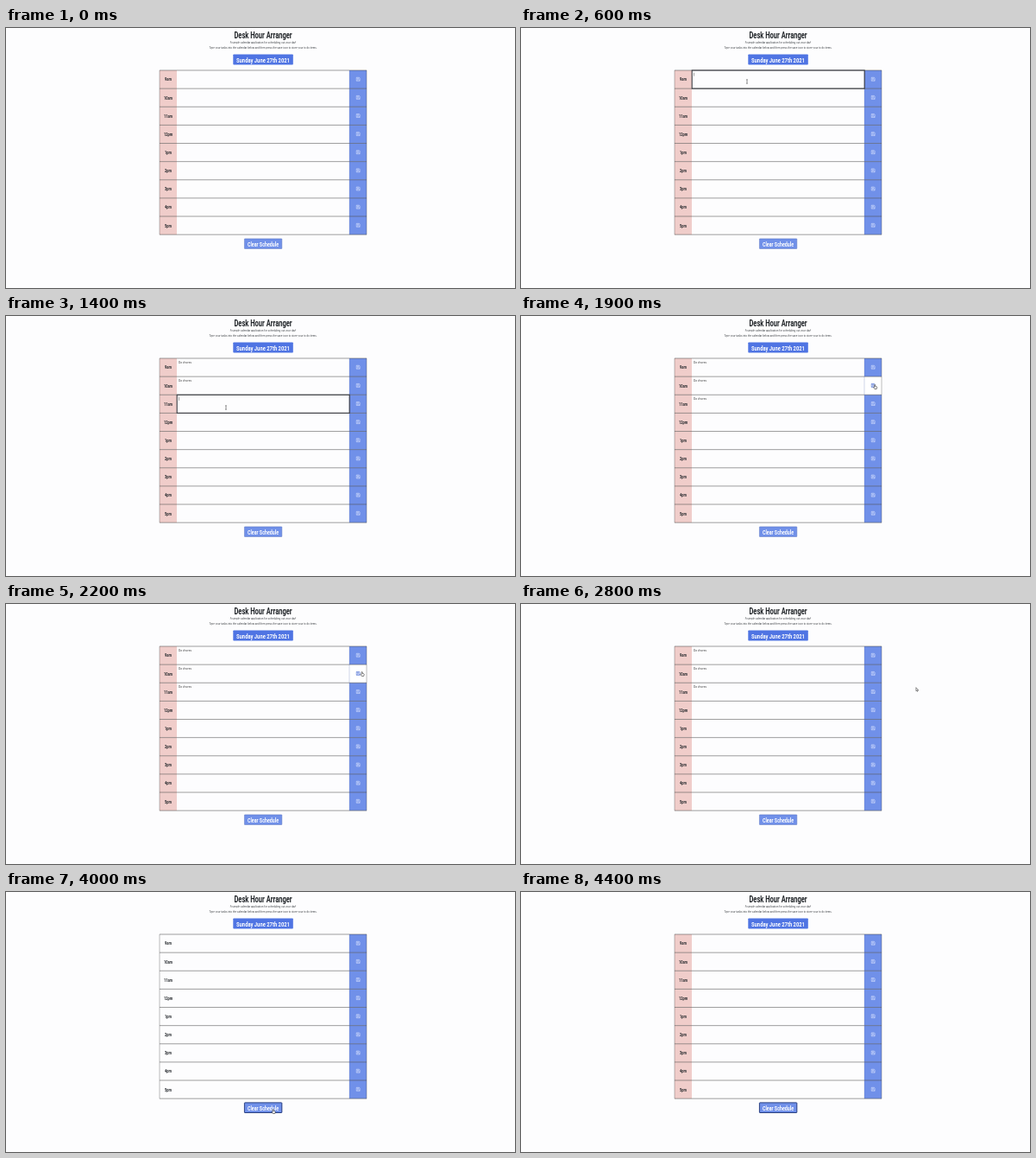
These frames come from a looping animation (590x301 px, 5700 ms). An HTML page:

```html
<!DOCTYPE html>
<html lang="en">
<head>
<meta charset="utf-8">
<title>Day planner</title>
<style>
  html, body { margin: 0; width: 100%; height: 100%; overflow: hidden; background: #fdfdfe; }
  svg { display: block; width: 590px; height: 301px; }
  .heading { font-family: Roboto, sans-serif; font-weight: 700; text-anchor: middle; }
  .small { font-family: Inter, sans-serif; font-size: 2.8px; text-anchor: middle; fill: #33373b; }
  .entry { font-family: "Noto Sans", sans-serif; font-size: 3.2px; fill: #333; }
</style>
</head>
<body>
<svg id="stage" viewBox="0 0 590 301"></svg>
<script>
const LOOP = 5700, STEP = 100;
const TOP = 49, ROW = 21.13, LEFT = 178, TEXT_LEFT = 198, SAVE_LEFT = 398, RIGHT = 418;
const HOURS = ["9am", "10am", "11am", "12pm", "1pm", "2pm", "3pm", "4pm", "5pm"];
const BLUE = "#7090e9", PINK = "#f0cdca", INK = "#212529", TASK = "Do chores";
const stage = document.getElementById("stage");

function add(tag, attrs, parent = stage, content = "") {
  const node = document.createElementNS("http://www.w3.org/2000/svg", tag);
  for (const key in attrs) node.setAttribute(key, attrs[key]);
  node.textContent = content;
  parent.append(node);
  return node;
}

const rect = (x, y, width, height, fill, more = {}) =>
  add("rect", { x, y, width, height, fill, ...more });

// One narrow face is shared by every heading.
const heading = (content, x, y, size, fill) => add("text", {
  class: "heading", "font-size": size, fill, transform: `translate(${x} ${y}) scale(.72 1)`
}, stage, content);

const show = (node, visible) => node.setAttribute("visibility", visible ? "visible" : "hidden");

heading("Desk Hour Arranger", 298, 11.6, 10.5, INK);
add("text", { class: "small", x: 298, y: 17.7 }, stage,
  "A simple calendar application for scheduling out your day!");
add("text", { class: "small", x: 298, y: 23.6 }, stage,
  "Type your tasks into the calendar below and then press the save icon to store your to do items.");
rect(263.3, 30.4, 69.5, 12.2, "#4f74e3", { rx: .8 });
heading("Sunday June 27th 2021", 298, 39.6, 8.1, "#fff");

const rows = HOURS.map((hour, i) => {
  const y = TOP + i * ROW, middle = y + ROW / 2;
  const label = rect(LEFT, y, TEXT_LEFT - LEFT, ROW, PINK);
  heading(hour, 188, middle + 1.9, 5.5, INK);
  const text = add("text", { class: "entry", x: 200, y: y + 5.8 });
  const save = rect(SAVE_LEFT, y, RIGHT - SAVE_LEFT, ROW, BLUE);
  const icon = add("path", {
    d: "M-2 -2H1.2L2 -1.2V2H-2Z M-1.2 -2V-.6H.8V-2 M-1.2 2V.5H1.2V2",
    transform: `translate(408.2 ${middle - .3})`, fill: "none", "stroke-width": .5
  });
  return { y, label, text, save, icon };
});

for (let i = 0; i <= HOURS.length; i++) {
  const y = TOP + i * ROW;
  add("path", { d: `M${LEFT} ${y}H${RIGHT}`, stroke: "#444", "stroke-opacity": .65, "stroke-width": .8 });
}
const bottom = TOP + ROW * HOURS.length;
add("path", {
  d: `M${LEFT} ${TOP}V${bottom}M${RIGHT} ${TOP}V${bottom}`,
  stroke: "#444", "stroke-opacity": .5, "stroke-width": .7
});
add("path", { d: `M${SAVE_LEFT} ${TOP}V${bottom}`, stroke: "#4b63a8", "stroke-opacity": .5, "stroke-width": .5 });

const button = rect(276.4, 243.9, 43.4, 11.6, BLUE, { rx: .5 });
heading("Clear Schedule", 298, 252.6, 7.4, "#fff");

const focusBox = rect(TEXT_LEFT + .2, 0, SAVE_LEFT - TEXT_LEFT, ROW, "none",
  { stroke: "#3b3d42", "stroke-width": 1.1 });
const caret = rect(0, 0, .4, 3.8, "#222");

const pointers = {
  beam: add("path", {
    d: "M-1 -2.2H-.3L0 -1.9L.3 -2.2H1M0 -1.9V1.9M-1 2.2H-.3L0 1.9L.3 2.2H1",
    fill: "none", stroke: "#333", "stroke-width": .55
  }),
  hand: add("path", {
    d: "M-.8 -2.3Q-.2 -2.9 .2 -2.2V-.6L1.8 -.2Q2.3 0 2.2 .7L1.7 2.5H-.7L-2 .6Q-1.7 -.2 -.8 .4Z",
    fill: "#fff", stroke: "#222", "stroke-width": .55
  }),
  arrow: add("path", {
    d: "M-1.1 -2.3V1.7L-.2 .9L.4 2.3L1.1 2L.5 .7H1.7Z",
    fill: "#fff", stroke: "#222", "stroke-width": .5
  })
};

// Pointer path: time, x, y.
const path = [
  [100, 300, 205], [400, 262, 62], [900, 262, 62], [1000, 255, 80], [1200, 255, 80],
  [1300, 255, 106], [1500, 255, 106], [1800, 408, 104], [2000, 413, 60], [2200, 413, 81],
  [2500, 413, 83], [2600, 413, 102], [2700, 430, 102], [2800, 459, 99], [3200, 459, 99],
  [3700, 310, 254], [4000, 310, 254], [4300, 473, 205]
];

function pointerAt(t) {
  const next = path.findIndex(point => point[0] >= t);
  if (next < 0 || t < path[0][0]) return null;
  const [t1, x1, y1] = path[next];
  const [t0, x0, y0] = path[Math.max(next - 1, 0)];
  const k = t1 > t0 ? (t - t0) / (t1 - t0) : 1;
  return { x: x0 + (x1 - x0) * k, y: y0 + (y1 - y0) * k };
}

function entryAt(i, t) {
  if (t >= 3900) return "";
  if (i === 0) return TASK.slice(0, Math.max(0, Math.ceil((t - 600) / 300 * TASK.length)));
  return (i === 1 && t >= 1200) || (i === 2 && t >= 1500) ? TASK : "";
}

function focusAt(t) {
  if (t < 500 || t >= 1900) return -1;
  return t < 1100 ? 0 : t < 1300 ? 1 : 2;
}

function draw(t) {
  const pointer = pointerAt(t), focus = focusAt(t);
  const inside = pointer && pointer.y > TOP && pointer.y < bottom;
  const onSave = inside && pointer.x > SAVE_LEFT && pointer.x < RIGHT;
  const onText = inside && pointer.x > TEXT_LEFT && pointer.x <= SAVE_LEFT;
  const onButton = pointer && Math.abs(pointer.x - 298) < 22 && Math.abs(pointer.y - 250) < 6;

  rows.forEach((row, i) => {
    const hover = onSave && pointer.y >= row.y && pointer.y < row.y + ROW;
    row.label.setAttribute("fill", t >= 3000 && t < 4400 ? "#fdfdfe" : PINK);
    row.text.textContent = entryAt(i, t);
    row.save.setAttribute("fill", hover ? "#fff" : BLUE);
    row.icon.setAttribute("stroke", hover ? "#3158cc" : "#dce5ff");
  });

  show(focusBox, focus >= 0);
  show(caret, focus >= 0);
  if (focus >= 0) {
    const row = rows[focus];
    focusBox.setAttribute("y", row.y);
    caret.setAttribute("x", 200.2 + (row.text.textContent ? row.text.getComputedTextLength() : 0));
    caret.setAttribute("y", row.y + 2.8);
  }

  const pressed = t >= 3900;
  button.setAttribute("stroke", pressed ? "#263d80" : "#5873bd");
  button.setAttribute("stroke-width", pressed ? 1 : .5);

  const kind = onSave || onButton ? "hand" : onText ? "beam" : "arrow";
  for (const name in pointers) {
    show(pointers[name], pointer && name === kind);
    if (pointer) pointers[name].setAttribute("transform", `translate(${pointer.x} ${pointer.y})`);
  }
}

const start = performance.now();
function tick() {
  const t = (performance.now() - start) % LOOP;
  draw(Math.floor(t / STEP) * STEP);
  requestAnimationFrame(tick);
}
tick();
</script>
</body>
</html>
```
